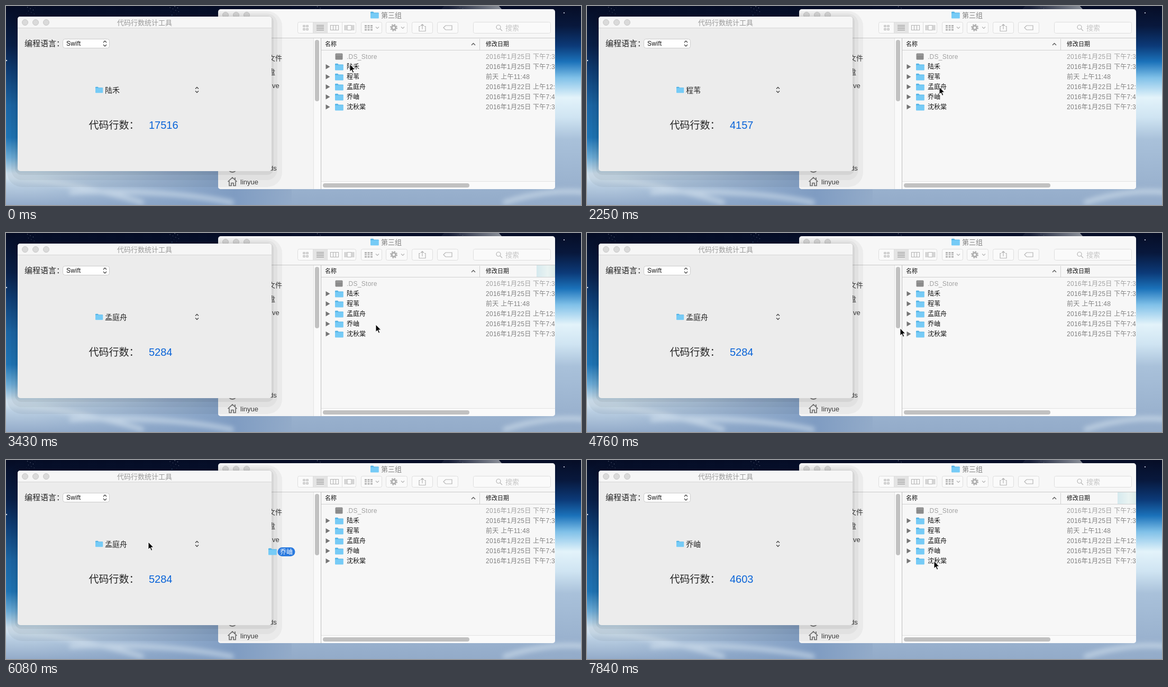
Recreate the animation shown at these times as an HTML page. Size 1087 by 376 pixels, loop 7.99 s.

```html
<!DOCTYPE html>
<html lang="zh">
<head>
<meta charset="utf-8">
<title>代码行数统计工具</title>
<style>
  html, body { margin: 0; width: 100%; height: 100%; overflow: hidden; background: #93abc9; }
  svg { display: block; width: 1087px; height: 376px; }
  text { font-family: "Liberation Sans", "Noto Sans CJK SC", "Noto Sans CJK", sans-serif; font-size: 12px; fill: #111; white-space: pre; }
  .spaced { letter-spacing: .27px; }
  .head { font-size: 11px; }
  .side { font-size: 13px; fill: #3c3c3c; }
  .soft { fill: #808080; }
  .dim { fill: #a0a0a0; }
  .app { fill: #242424; }
  .button { fill: #fafafa; stroke: #dedede; }
  .glyph { fill: none; stroke: #b4b4b4; stroke-width: 1.2; }
  .solid { fill: #b4b4b4; }
  .light { fill: #dadada; stroke: #c8c8c8; }
  .thumb { fill: #c1c1c1; }
  .line { stroke: #d0d0d0; }
  .arrows { fill: none; stroke: #444; stroke-width: 1.3; }
</style>
</head>
<body>
<svg id="stage" viewBox="0 0 1087 376">
  <defs>
    <linearGradient id="skyL" x2="0" y2="1">
      <stop stop-color="#050c24"/><stop offset=".2" stop-color="#08204a"/>
      <stop offset=".33" stop-color="#0f3f78"/><stop offset=".5" stop-color="#1c68a8"/>
      <stop offset=".66" stop-color="#1f78bb"/><stop offset=".76" stop-color="#6fb0dc"/>
      <stop offset=".84" stop-color="#cfe2f0"/><stop offset="1" stop-color="#93abc9"/>
    </linearGradient>
    <linearGradient id="skyR" x2="0" y2="1">
      <stop stop-color="#060d26"/><stop offset=".1" stop-color="#08183c"/>
      <stop offset=".2" stop-color="#0c3a78"/><stop offset=".28" stop-color="#1b72ba"/>
      <stop offset=".36" stop-color="#7fc0e8"/><stop offset=".46" stop-color="#e3f3fa"/>
      <stop offset=".56" stop-color="#cfe4f2"/><stop offset=".67" stop-color="#a9c1da"/>
      <stop offset="1" stop-color="#93abc9"/>
    </linearGradient>
    <linearGradient id="haze">
      <stop offset=".1" stop-color="#86a2c6" stop-opacity="0"/><stop offset=".8" stop-color="#7f9cc2"/>
      <stop offset="1" stop-color="#93abc9"/>
    </linearGradient>
    <linearGradient id="moon"><stop offset=".2" stop-color="#161d36"/><stop offset=".9" stop-color="#8b9099"/></linearGradient>
    <linearGradient id="tint"><stop stop-color="#d5e9ee"/><stop offset=".6" stop-color="#e9f3f2"/><stop offset="1" stop-color="#dcebe9"/></linearGradient>
    <linearGradient id="badge" x2="0" y2="1"><stop stop-color="#5ccb4a"/><stop offset="1" stop-color="#0b8f12"/></linearGradient>
    <filter id="blur"><feGaussianBlur stdDeviation="5"/></filter>
    <clipPath id="pane"><rect x="401" y="6" width="637" height="340" rx="5"/></clipPath>
    <g id="folder">
      <path d="M0 2q0-1.2 1.2-1.2h4l1.4 1.6h8q1.2 0 1.2 1.2v1H0z" fill="#55b4e6"/>
      <rect y="3.4" width="15.8" height="10.2" rx="1" fill="#76cbf6"/>
    </g>
    <path id="updown" class="arrows" d="M-3-2l3-3 3 3M-3 2l3 3 3-3"/>
    <path id="down" class="glyph" d="M-3-1.5l3 3 3-3"/>
  </defs>

  <rect width="540" height="376" fill="url(#skyL)"/>
  <rect x="540" width="547" height="376" fill="url(#skyR)"/>
  <rect y="308" width="540" height="68" fill="url(#haze)"/>
  <g filter="url(#blur)" fill="none" stroke="#d9e6f1" stroke-width="9" opacity=".6">
    <path d="M-10 322Q120 330 260 372M120 352Q300 345 430 372M940 372Q1020 345 1095 352"/>
  </g>
  <circle cx="880" cy="50" r="72" fill="url(#moon)"/>
  <g id="stars" fill="#dfe8f5"></g>

  <g clip-path="url(#pane)">
    <rect x="401" y="6" width="637" height="340" fill="#f7f7f7"/>
    <rect x="401" y="61" width="180" height="285" fill="#f4f4f4"/>
    <path d="M401 60.5h637" stroke="#c8c8c8"/>
    <g id="lights2"></g>
    <use href="#folder" x="689" y="10"/>
    <text x="709" y="21.5" style="font-size:13px" fill="#999" class="soft">第三组</text>

    <g class="button">
      <rect x="551.5" y="30.5" width="110" height="21" rx="3"/>
      <rect x="580.5" y="30.5" width="27" height="21" fill="#e4e4e4"/>
      <path d="M635.5 30.5v21"/>
      <rect x="671.5" y="30.5" width="39" height="21" rx="3"/>
      <rect x="718.5" y="30.5" width="40" height="21" rx="3"/>
      <rect x="767.5" y="30.5" width="39" height="21" rx="3"/>
      <rect x="815.5" y="30.5" width="39" height="21" rx="3"/>
      <rect x="883.5" y="30.5" width="146" height="21" rx="3"/>
    </g>
    <g class="glyph">
      <path d="M562 36.500h3v3h-3zM568 36.500h3v3h-3zM562 42.500h3v3h-3zM568 42.500h3v3h-3z"/>
      <path d="M587 36.500h14M587 39.500h14M587 42.500h14M587 45.500h14" stroke="#8e8e8e"/>
      <path d="M613.500 36.500h15v9h-15zM618.500 36.500v9M623.500 36.500v9"/>
      <path d="M645 36.500h8v9h-8zM640.500 36v10M642.800 36v10M655.200 36v10M657.500 36v10"/>
      <path d="M783 38.500h-2v9h12v-9h-2M787 44v-9M784 37.500l3-3 3 3"/>
      <path d="M827 41l4-4h12v8h-12z"/>
      <circle cx="931" cy="40" r="4"/><path d="M934 43l4 4"/>
    </g>
    <g class="solid">
      <path d="M678 36h4v3h-4zM683.500 36h4v3h-4zM689 36h4v3h-4zM678 40h4v2h-4zM683.500 40h4v2h-4zM689 40h4v2h-4zM678 43.500h4v3h-4zM683.500 43.500h4v3h-4zM689 43.500h4v3h-4z"/>
    </g>
    <circle cx="733" cy="41" r="3.700" fill="none" stroke="#b0b0b0" stroke-width="3"/>
    <circle cx="733" cy="41" r="6" fill="none" stroke="#b0b0b0" stroke-width="2" stroke-dasharray="2.4 2.31"/>
    <use href="#down" x="702" y="41"/><use href="#down" x="750" y="41"/>
    <text x="944" y="46" style="font-size:13px;fill:#c4c4c4">搜索</text>

    <text class="side" x="496" y="103">文件</text>
    <text class="side" x="496" y="129">盘</text>
    <text class="side" x="500" y="155">ive</text>
    <text class="side" x="498" y="311">ds</text>
    <circle cx="428" cy="306" r="8" fill="none" stroke="#777" stroke-width="2"/>
    <path d="M419.500 332l8.500-8 8.500 8M422 331v8.500h4v-5h4v5h4v-8.500M433 328v-4" fill="none" stroke="#6d6d6d" stroke-width="1.600"/>
    <text class="side" x="443" y="337">linyue</text>

    <rect x="581" y="61" width="14" height="285" fill="#fafafa"/>
    <path d="M581.500 61v285" stroke="#e2e2e2"/>
    <rect class="thumb" x="584" y="64" width="8" height="116" rx="4"/>
    <path d="M595.500 61v285" stroke="#bdbdbd"/>

    <path class="line" d="M596 83.500h442M895.500 62v21"/>
    <rect id="patch" x="1003" y="61" width="35" height="22" fill="url(#tint)"/>
    <text class="head" x="603" y="76">名称</text>
    <text class="head" x="907" y="76">修改日期</text>
    <path d="M880 74l3.500-3.500 3.500 3.500" fill="none" stroke="#555" stroke-width="1.300"/>
    <g id="rows"></g>
    <rect x="596" y="332" width="442" height="14" fill="#fafafa"/>
    <path d="M596 331.500h442" stroke="#e2e2e2"/>
    <rect class="thumb" x="599" y="335" width="277" height="8" rx="4"/>
  </g>

  <g fill="#000" opacity=".045">
    <rect x="2" y="10" width="520" height="332" rx="28"/>
  </g>
  <rect x="10" y="14" width="503" height="315" rx="20" opacity=".04"/>
  <rect x="17" y="18" width="489" height="301" rx="12" opacity=".06"/>

  <rect x="22" y="20" width="480" height="292" rx="5" fill="#ececec"/>
  <path d="M22 42V25q0-5 5-5h470q5 0 5 5v17z" fill="#f6f6f6"/>
  <path d="M22 41.500h480" stroke="#d6d6d6"/>
  <g id="lights1"></g>
  <text x="210" y="35.500" style="font-size:13px;fill:#9a9a9a">代码行数统计工具</text>
  <text class="app" x="35" y="76" style="font-size:15px">编程语言：</text>
  <rect x="107.500" y="62.500" width="88" height="17" rx="4" fill="#fff" stroke="#cbcbcb"/>
  <text class="spaced" x="114" y="75">Swift</text>
  <use href="#updown" x="187" y="71"/>
  <use href="#folder" transform="translate(169 152) scale(.9)"/>
  <text class="app" id="chosen" x="187" y="164" style="font-size:14px"></text>
  <use href="#updown" x="361" y="158.500"/>
  <text class="app" x="156.500" y="232" style="font-size:19px">代码行数：</text>
  <text id="count" x="270" y="232" style="font-size:20px;fill:#0a64d8"></text>

  <g id="drag">
    <use href="#folder" y="1"/>
    <rect id="pill" x="17.500" width="33" height="17" rx="8.500" fill="#2a7adf"/>
    <text id="dragName" x="22" y="13" style="fill:#fff"></text>
  </g>
  <g id="plus">
    <circle cx="10" cy="23" r="9.300" fill="url(#badge)" stroke="#1c8a1c" stroke-width=".6"/>
    <path d="M10 18v10M5 23h10" stroke="#fff" stroke-width="2.600"/>
  </g>
  <path id="cursor" d="M0 0V14l3.200-3 2.300 5.300 2.300-1-2.300-5.200h4.300z" fill="#000" stroke="#fff" stroke-width="1"/>
</svg>
<script>
const LOOP = 7990;
const $ = id => document.getElementById(id);
const names = ["陆禾", "程苇", "孟庭舟", "乔岫", "沈秋棠"];
const dates = ["2016年1月25日 下午7:35", "前天 上午11:48", "2016年1月22日 上午12:10", "2016年1月25日 下午7:42", "2016年1月25日 下午7:36"];

function add(parent, tag, attrs, text) {
  const node = document.createElementNS("http://www.w3.org/2000/svg", tag);
  for (const key in attrs) node.setAttribute(key, attrs[key]);
  if (text) node.textContent = text;
  return parent.appendChild(node);
}

function addLights(group, x, y) {
  for (let i = 0; i < 3; i++) add(group, "circle", { class: "light", cx: x + 20 * i, cy: y, r: 5.5 });
}
addLights($("lights1"), 36, 31);
addLights($("lights2"), 415, 17);

for (let i = 0; i < 40; i++) {
  const x = (i * 271.3 + 55) % 1087;
  add($("stars"), "circle", { cx: x, cy: (i * 7.7 + 3) % 19, r: .4 + (i % 3) * .2, opacity: .35 + (i % 4) * .12 });
}
add($("stars"), "circle", { cx: 1055, cy: 13, r: 1.1 });
add($("stars"), "circle", { cx: 1, cy: 103, r: 1.2 });

const rows = $("rows");
add(rows, "rect", { x: 622.5, y: 89.5, width: 14, height: 12, rx: 1.5, fill: "#8b8b8b" });
add(rows, "path", { d: "M624 92.500h11", stroke: "#a8a8a8" });
add(rows, "text", { class: "dim spaced", x: 644, y: 100 }, ".DS_Store");
add(rows, "text", { class: "dim spaced", x: 907, y: 100 }, dates[0]);
names.forEach((name, i) => {
  const y = 115 + 19 * i;
  add(rows, "path", { d: `M604.500 ${y - 5}l8 4.700-8 4.700z`, fill: "#767676" });
  add(rows, "use", { href: "#folder", x: 622, y: y - 7 });
  add(rows, "text", { x: 644, y: y + 4 }, name);
  add(rows, "text", { class: "soft spaced", x: 907, y: y + 4 }, dates[i]);
});

// Pointer stops, evenly spaced from the first time to the second.
const moves = [
  [0, 0, "650,110"],
  [150, 1180, "651,117 653,127 645,132 575,142 480,152 385,160 320,164 298,163"],
  [1370, 2400, "298,163 335,166 455,173 605,179 727,178 692,164 666,153 660,154"],
  [2550, 3580, "565,158 430,161 318,163 300,164 425,168 600,174 699,173 688,172"],
  [3720, 4760, "655,171 630,172 525,174 430,175 398,176 420,178 505,180 592,180"],
  [4900, 5930, "638,176 655,171 648,171 612,171 570,171 532,171 395,164 281,159"],
  [6080, 6370, "269,155 256,157 243,159"],
  [6660, 6960, "248,159 262,158 276,158"],
  [7250, 7840, "305,164 410,176 540,187 635,192 656,191"]
];
const stops = moves.flatMap(([from, to, path]) => path.split(" ").map((point, i, all) => {
  const time = from + (to - from) * i / Math.max(1, all.length - 1);
  return [Math.floor(time / 10) * 10, ...point.split(",").map(Number)];
}));

// from, to, row, time after which the dragged label stays put
const drags = [[440, 1370, 1, 1370], [2400, 2990, 2, 2990], [3860, 4460, 3, 4460], [5190, 6660, 3, 5640]];
const results = [[0, 0, 17516], [1370, 1, 4157], [2990, 2, 5284], [6660, 3, 4603]];
const patches = [[3280, 3860], [6660, LOOP]];

const lastBefore = (list, t) => list.filter(item => item[0] <= t).pop();
const during = (list, t) => list.find(item => item[0] <= t && t < item[1]);
const place = (node, x, y) => node.setAttribute("transform", `translate(${x} ${y})`);
const show = (node, on) => node.setAttribute("visibility", on ? "visible" : "hidden");

function draw(now) {
  const t = now % LOOP;
  const [, x, y] = lastBefore(stops, t);
  const [, row, count] = lastBefore(results, t);
  const drag = during(drags, t);
  place($("cursor"), x, y);
  place($("plus"), x, y);
  $("chosen").textContent = names[row];
  $("count").textContent = count;
  show($("patch"), during(patches, t));
  show($("drag"), drag);
  show($("plus"), drag && t < drag[3] && x < 390);
  if (drag) {
    const [, dx, dy] = lastBefore(stops, Math.min(t, drag[3]));
    const name = names[drag[2]];
    place($("drag"), dx - 36, dy - 6);
    $("dragName").textContent = name;
    $("pill").setAttribute("width", 12 * name.length + 9);
  }
}

const start = performance.now();
(function tick() {
  draw(performance.now() - start);
  requestAnimationFrame(tick);
})();
</script>
</body>
</html>
```
